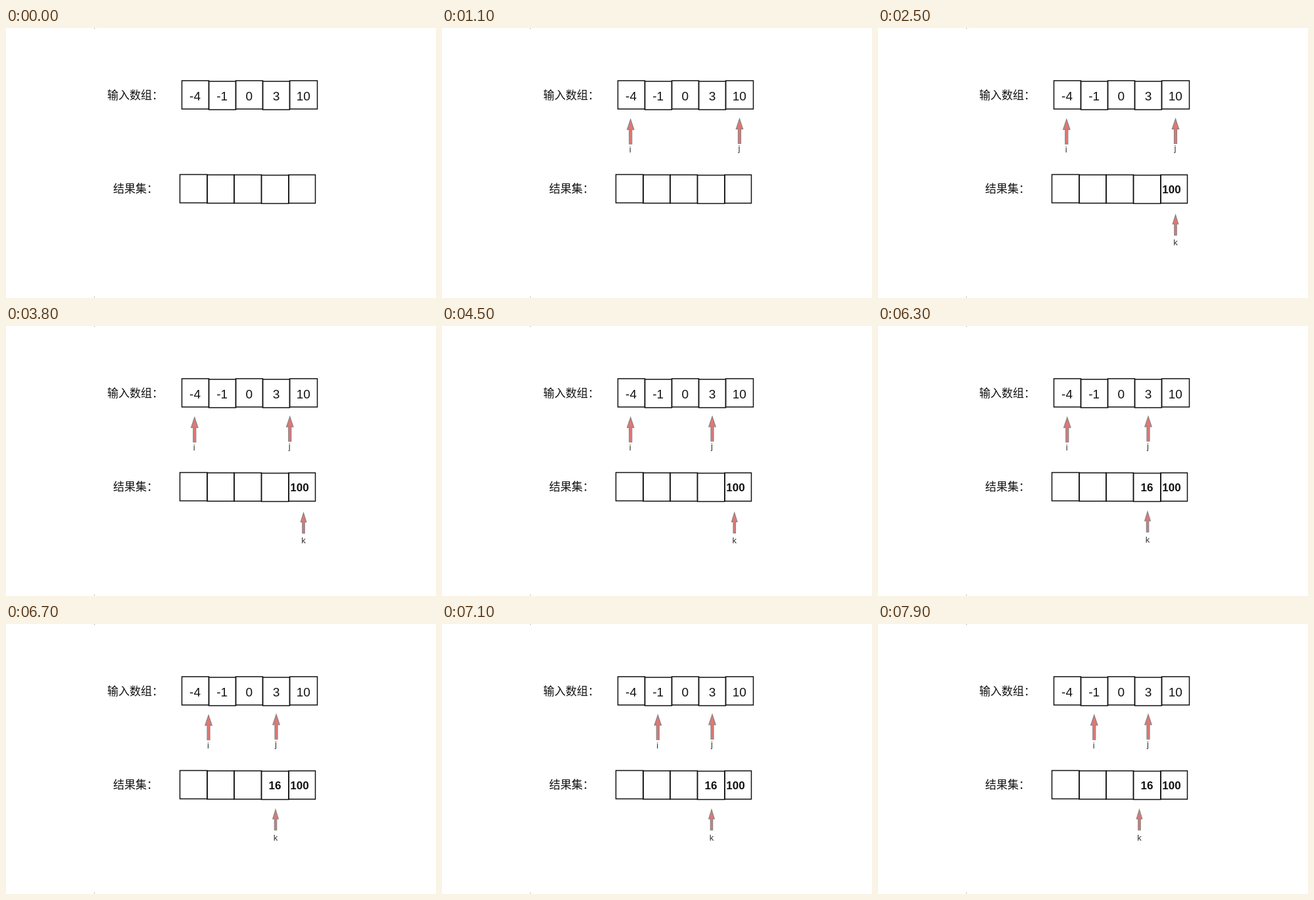
These frames come from a looping animation (654 px wide and 410 px high, 8000 ms). An HTML page with a canvas:

```html
<!DOCTYPE html>
<html lang="zh-CN">
<head>
<meta charset="utf-8">
<title>双指针</title>
<style>
  html, body { margin: 0; width: 100%; height: 100%; overflow: hidden; background: #fff; }
  canvas { display: block; }
</style>
</head>
<body>
<canvas id="stage" width="654" height="410"></canvas>
<script>
const ctx = document.getElementById('stage').getContext('2d');
const LOOP = 8000, STEP = 100;
const SANS = '"Liberation Sans", Arial, sans-serif';
const CJK = '"Noto Sans CJK SC", "Noto Sans CJK", sans-serif';
const INK = '#111';

function text(str, x, y, font, align = 'center', color = INK) {
  ctx.font = font;
  ctx.textAlign = align;
  ctx.fillStyle = color;
  ctx.fillText(str, x, y);
}

// Cells sit slightly unevenly, as if placed by hand.
function row(edges, top, drops) {
  ctx.strokeStyle = INK;
  ctx.lineWidth = 1.5;
  drops.forEach((drop, n) =>
    ctx.strokeRect(edges[n], top + drop, edges[n + 1] - edges[n], 43));
}

function arrow(x, tip, height, half, headHeight, shaft) {
  const neck = tip + headHeight, end = tip + height;
  ctx.beginPath();
  ctx.moveTo(x, tip);
  ctx.lineTo(x + half, neck);
  ctx.lineTo(x + shaft, neck);
  ctx.lineTo(x + shaft, end);
  ctx.lineTo(x - shaft, end);
  ctx.lineTo(x - shaft, neck);
  ctx.lineTo(x - half, neck);
  ctx.closePath();
  ctx.fillStyle = '#e07774';
  ctx.fill();
  ctx.strokeStyle = '#8b8487';
  ctx.lineWidth = 1.2;
  ctx.stroke();
}

function pointer(name, x, tip, baseline) {
  arrow(x, tip, 37.5, 5.2, 15.5, 2);
  text(name, x - 0.5, baseline, '13px ' + SANS, 'center', '#333');
}

const progress = (t, from, to) => Math.min(1, Math.max(0, (t - from) / (to - from)));

function draw(t) {
  ctx.fillStyle = '#fff';
  ctx.fillRect(0, 0, 654, 410);
  ctx.fillStyle = '#888';
  ctx.fillRect(134, 0, 1, 1);
  ctx.fillRect(134, 408, 1, 1);

  text('输入数组：', 154, 108, '500 17px ' + CJK, 'left');
  text('结果集：', 163, 250, '500 17px ' + CJK, 'left');
  row([267.5, 308.5, 349.5, 390.5, 431.5, 473.5], 80, [0, 1, 0, 1, 0]);
  row([264.5, 306, 347, 388.5, 430, 470.5], 222.5, [0, 0.5, 0.5, 1, 0.5]);
  ['-4', '-1', '0', '3', '10'].forEach((value, n) =>
    text(value, 287.5 + n * 41.2, 109.5, '19px ' + SANS));

  if (t >= 100) {
    const p = progress(t, 6280, 7110);
    pointer('i', 286.8 + 42 * p, 138.7 - 0.5 * p, 189 - 0.5 * p);
  }
  if (t >= 1000) {
    const p = progress(t, 3300, 4300);
    pointer('j', 452.5 - 41.5 * p, 137.8 - 0.5 * p, 187);
  }
  if (t >= 1800) {
    const p = progress(t, 4300, 5400);
    const x = 452.5 - 42.5 * p - 12.5 * progress(t, 7570, 7900);
    arrow(x, 283.7 - 1.8 * p, 31, 4.3, 14, 1.7);
    text('k', x, 330.3 - 1.8 * p, '13px ' + SANS, 'center', '#333');
  }

  if (t >= 2500) text('100', 446.5, 251, 'bold 17px ' + SANS);
  if (t >= 5600) text('16', 409, 251, 'bold 17px ' + SANS);
}

function frame() {
  const t = performance.now() % LOOP;
  draw(Math.floor(t / STEP) * STEP);
  requestAnimationFrame(frame);
}
frame();
</script>
</body>
</html>
```
